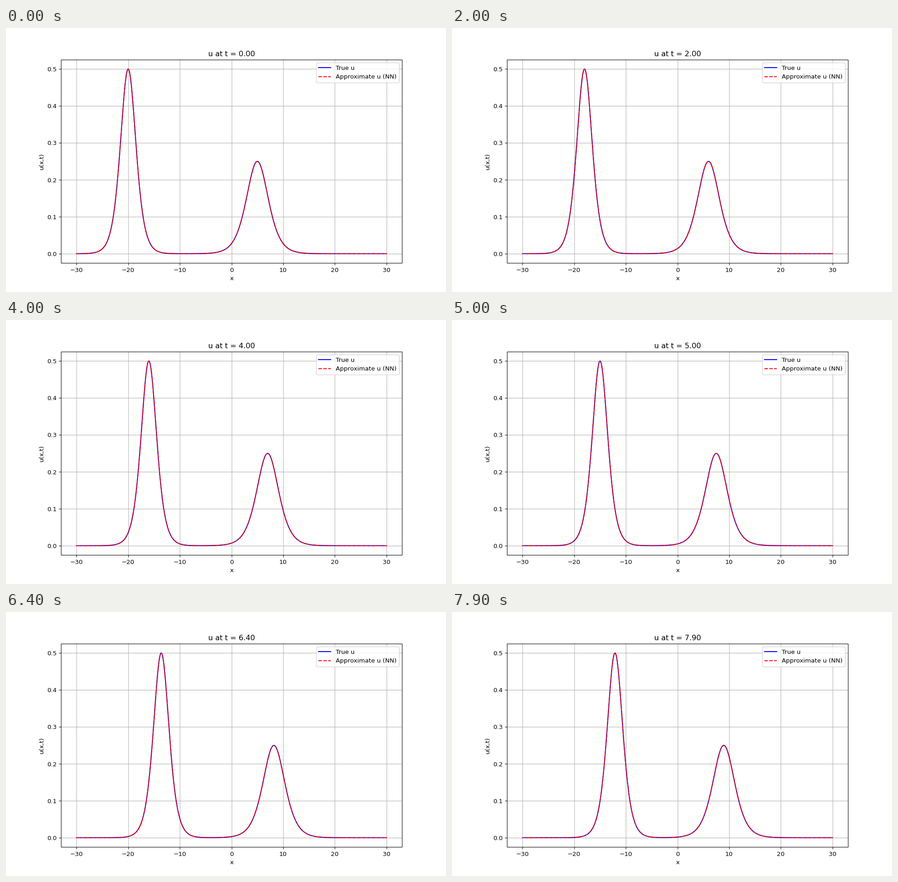
A matplotlib script that plays this animation: 966x580 px, repeating every 8000 ms.

```python
import matplotlib.pyplot as plt
import numpy as np
from matplotlib.animation import FuncAnimation
from matplotlib.patches import Rectangle
from matplotlib.transforms import Affine2D

FRAMES, STEP_MS = 80, 100
W, H, SCALE = 966, 580, 0.966  # stage size; a 1000 x 600 layout scaled down
LEFT, TOP, RIGHT, BOTTOM = 125, 72, 900, 534  # axes box in the layout
XLIM, YLIM = (-33, 33), (-0.025, 0.525)
XTICKS, YTICKS = np.arange(-30, 31, 10), np.arange(6) / 10
TICK_LEN = 4.9
SOLITONS = [(1.0, -20.0), (0.5, 5.0)]  # speed, starting centre

x = np.linspace(-30, 30, 500)


def wave(t):
    """Sum of two KdV solitons, each of height c / 2 and speed c."""
    return sum(c / 2 / np.cosh(np.sqrt(c) / 2 * (x - c * t - x0)) ** 2
               for c, x0 in SOLITONS)


def snap(p):
    """Centre of the layout pixel that a thin line falls on."""
    return np.floor(p + 0.5) + 0.5


def rule(xs, ys, color, zorder):
    ax.plot(xs, ys, color=color, lw=0.8, zorder=zorder, snap=False,
            transform=layout, clip_on=False, solid_capstyle="butt")


# the tiny surplus keeps the pixel size from being rounded down
dpi = 100 * SCALE
fig, ax = plt.subplots(figsize=((W + 0.01) / dpi, (H + 0.01) / dpi), dpi=dpi)
layout = Affine2D().scale(W / 1000, -H / 600).translate(0, H)

true_line, = ax.plot(x, wave(0), "b-", label="True u")
nn_line, = ax.plot(x, wave(0), "r--", label="Approximate u (NN)")
ax.set(xlim=XLIM, ylim=YLIM, xticks=XTICKS, yticks=YTICKS,
       xlabel="x", ylabel="u(x,t)")
ax.legend(loc="upper right")
title = ax.set_title("u at t = 0.00")

# grid, tick marks and frame sit on layout pixels
ax.tick_params(color="none")
ax.spines[:].set_visible(False)
for v in XTICKS:
    p = snap(LEFT + (RIGHT - LEFT) * (v - XLIM[0]) / (XLIM[1] - XLIM[0]))
    rule([p, p], [TOP, BOTTOM], "#b0b0b0", 1)
    rule([p, p], [BOTTOM + 0.5, BOTTOM + 0.5 + TICK_LEN], "black", 2)
for v in YTICKS:
    p = snap(TOP + (BOTTOM - TOP) * (YLIM[1] - v) / (YLIM[1] - YLIM[0]))
    rule([LEFT, RIGHT], [p, p], "#b0b0b0", 1)
    rule([LEFT + 0.5 - TICK_LEN, LEFT + 0.5], [p, p], "black", 2)
fig.add_artist(Rectangle((snap(LEFT), snap(TOP)), RIGHT - LEFT, BOTTOM - TOP,
                         fill=False, ec="black", lw=0.8, snap=False,
                         transform=layout))


def update(i):
    t = i * STEP_MS / 1000
    u = wave(t)
    true_line.set_ydata(u)
    nn_line.set_ydata(u)
    title.set_text(f"u at t = {t:.2f}")
    return true_line, nn_line, title


anim = FuncAnimation(fig, update, frames=FRAMES, interval=STEP_MS,
                     repeat=True, repeat_delay=0, blit=False)
plt.show()
```
